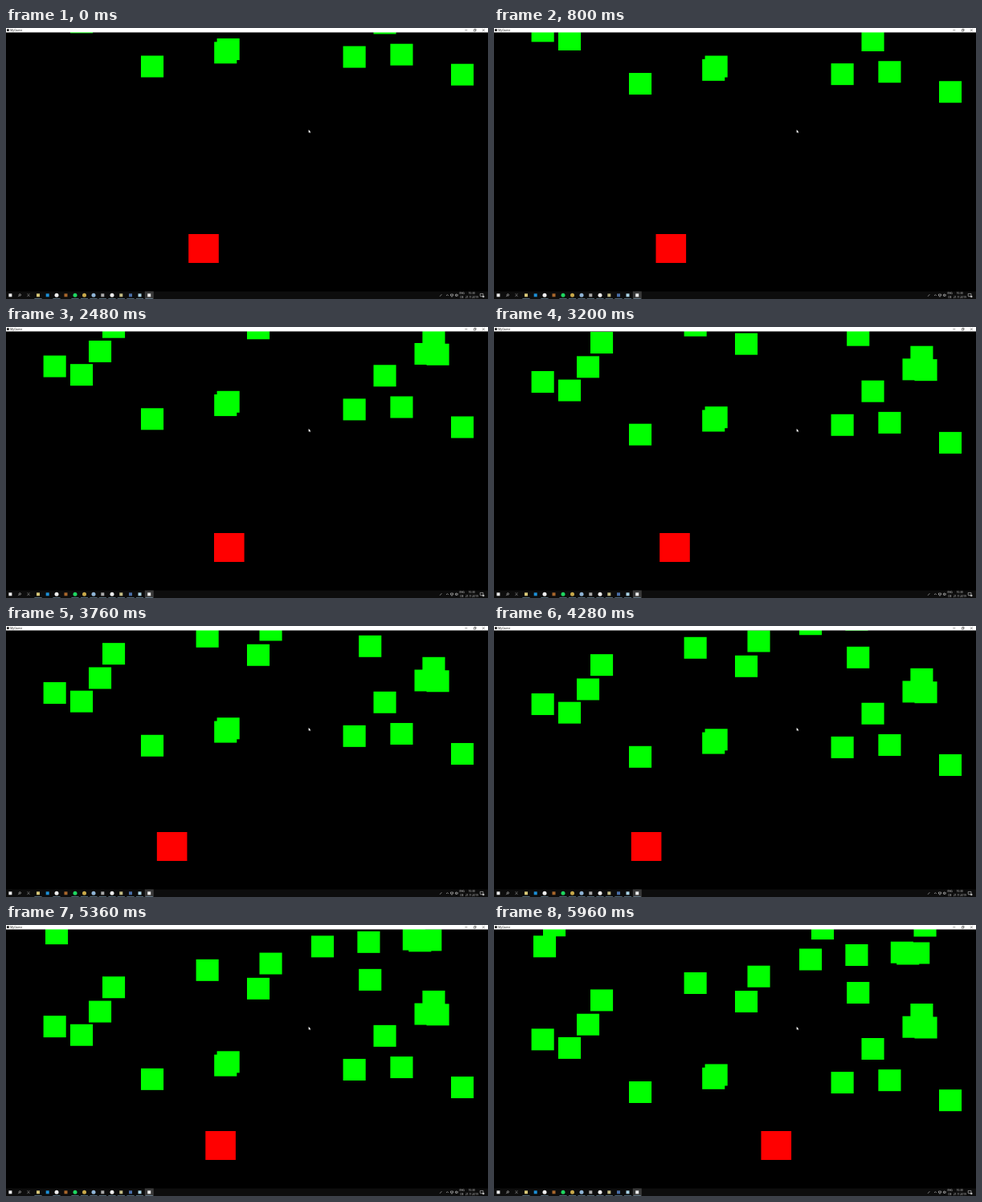
An HTML page for the animation above (6000 ms loop, 600 by 338 pixels).

```html
<!DOCTYPE html>
<html lang="en">
<head>
<meta charset="utf-8">
<title>MyGame</title>
<style>
  html, body { margin: 0; width: 100%; height: 100%; overflow: hidden; background: #000; }
  svg { display: block; width: 600px; height: 338px; }
  text { font-family: "Open Sans", "Noto Sans", sans-serif; }
</style>
</head>
<body>
<svg viewBox="0 0 600 338">
  <rect width="600" height="338" fill="#000"/>
  <g id="blocks" fill="#0f0"></g>
  <rect id="player" y="257" width="37.6" height="36" fill="#f00"/>
  <path d="M376.7 126.7v4l.9-.8.6 1.3.6-.3-.6-1.2h1.2z" fill="#fff"/>

  <!-- title bar -->
  <rect width="600" height="5.5" fill="#fff"/>
  <rect x="1" y="1.2" width="2.8" height="2.8" fill="#222"/>
  <text x="5" y="4" font-size="3.7" fill="#222">MyGame</text>
  <g fill="none" stroke="#333" stroke-width=".5">
    <path d="M571.3 2.7h3M593 1.3l2.8 2.8m0-2.8l-2.8 2.8"/>
    <path d="M582.3 2h2.1v2.1h-2.1zM583 2v-.7h2.1v2.1h-.7"/>
  </g>

  <!-- taskbar -->
  <rect y="328.5" width="600" height="9.5" fill="#0d0d0d"/>
  <rect x="172.8" y="328.5" width="11" height="9.5" fill="#3a3a3a"/>
  <g id="icons"></g>
  <g id="lines" fill="#7b9db5"></g>
  <g fill="none" stroke="#ddd" stroke-width=".55">
    <circle cx="17.3" cy="332.9" r="1.2"/>
    <path d="M16.4 333.8l-1.2 1.3"/>
    <path d="M26.5 331.8h.8m1.4 0h.8M26.5 334.6h.8m1.4 0h.8M27 333.2h2"/>
    <path d="M540 334.8l2.4-2.6M548 334l1.4-1.4 1.4 1.4"/>
    <path d="M553.5 332h3v2h-3zM554.2 335h1.6"/>
    <path d="M559.3 332.6v1.4h.7l1 .9v-3.2l-1 .9zM562 332q.9 1.3 0 2.6"/>
    <path d="M590.2 331.4h3.8v3h-1.5l-.8.9v-.9h-1.5z"/>
  </g>
  <circle cx="594.2" cy="335" r="1.3" fill="#bbb"/>
  <g font-size="3.1" fill="#ddd" text-anchor="middle">
    <text x="567.6" y="332.2">ENG</text>
    <text x="567.6" y="336.9">DE</text>
    <text x="579.8" y="332.2">10:30</text>
    <text x="579.8" y="336.9">21.11.2019</text>
  </g>
</svg>
<script>
  const LOOP = 6000, STEP = 40;
  const FALL = 0.02693; // px per ms

  // x and starting y of each falling block
  const starts = [
    [168, 34.5], [262.6, 13], [259.2, 17.3], [419.6, 22.6], [478.4, 19.7],
    [554, 44.7], [80, -20.6], [457.5, -19.5], [46.6, -31.2], [103, -49.8],
    [508.5, -46.8], [523.5, -46], [518.4, -62.5], [120, -80.1], [300, -78.5],
    [439.2, -89.5], [236.6, -101.5], [315.5, -109.8], [380, -131],
    [437.4, -136.5], [493.8, -139.8], [501.2, -138], [514.2, -139],
    [49, -147.2], [61, -173.3], [395, -169.4], [522.5, -173]
  ];

  // time and x of the player
  const path = [
    [0, 227.2], [800, 201.5], [1760, 311.8], [3200, 206.2],
    [4280, 170.8], [5360, 248.3], [5960, 332.5]
  ];

  // taskbar icons: centre x, colour, round or square
  const icons = [
    [5.4, "#eee", 0], [40, "#d8c878", 0], [51.7, "#1c8fd6", 0], [63, "#eee", 1],
    [74.5, "#a8672c", 0], [86, "#1ed760", 1], [97.5, "#c9a94a", 1],
    [109, "#8fb4d6", 1], [120.3, "#aaa", 0], [132, "#eee", 1],
    [143.3, "#c5bd85", 0], [155, "#4a6fa8", 0], [166.5, "#a9d3e6", 0],
    [178.2, "#eee", 0]
  ];

  const byId = id => document.getElementById(id);

  function add(parent, tag, attrs) {
    const el = document.createElementNS("http://www.w3.org/2000/svg", tag);
    for (const key in attrs) el.setAttribute(key, attrs[key]);
    return parent.appendChild(el);
  }

  const blocks = byId("blocks"), player = byId("player");
  for (const [x, y] of starts) {
    add(blocks, "rect", { x, y, width: 28.1, height: 27 });
  }

  icons.forEach(([x, fill, round], i) => {
    if (round) add(byId("icons"), "circle", { cx: x, cy: 333.3, r: 2.5, fill });
    else add(byId("icons"), "rect", { x: x - 2, y: 331.3, width: 4, height: 4, fill });
    if (i !== 0 && i !== 2 && i !== 4) {
      add(byId("lines"), "rect", { x: x - 4.6, y: 337.4, width: 9.2, height: 0.6 });
    }
  });

  function playerX(t) {
    const i = Math.max(1, path.findIndex(p => p[0] >= t));
    const [t0, x0] = path[i - 1], [t1, x1] = path[i];
    return x0 + (x1 - x0) * (t - t0) / (t1 - t0);
  }

  function draw() {
    const t = Math.floor(performance.now() % LOOP / STEP) * STEP;
    blocks.setAttribute("transform", `translate(0 ${t * FALL})`);
    player.setAttribute("x", playerX(t));
    requestAnimationFrame(draw);
  }
  draw();
</script>
</body>
</html>
```
